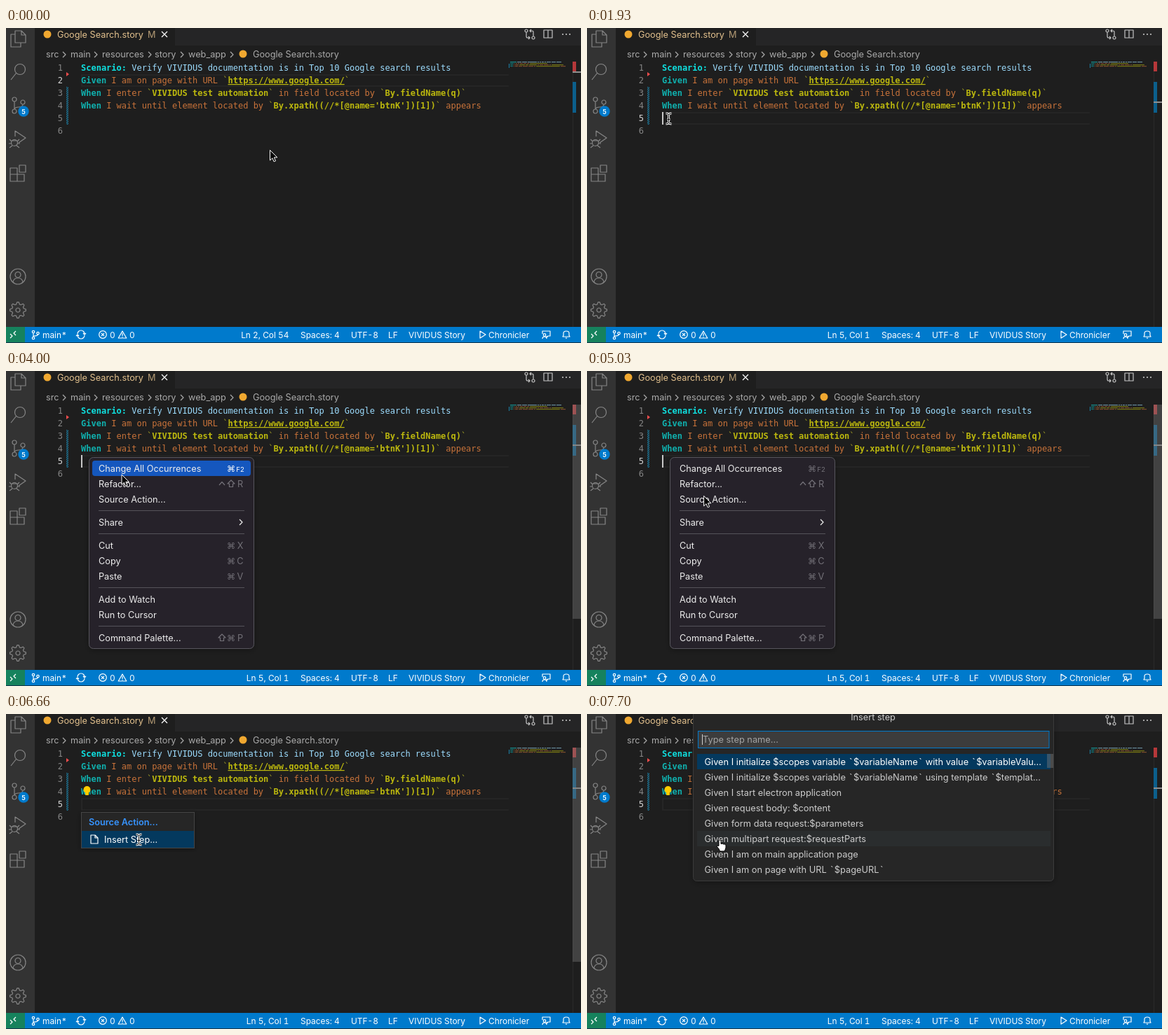
Recreate the animation shown at these times as an HTML page. Size 820x450 px, loop 7.99 s.

```html
<!DOCTYPE html>
<html lang="en">
<head>
<meta charset="utf-8">
<title>Story editor</title>
<style>
  html, body { margin: 0; width: 100%; height: 100%; overflow: hidden; background: #1e1e1e; }
  svg { display: block; }
  text { white-space: pre; font: 12.72px Inter, sans-serif; }
  .status { font-size: 11.9px; font-variant-numeric: tabular-nums; fill: #fff; }
  .code { font: 12px "DejaVu Sans Mono", monospace; }
  .step { font-size: 12.82px; }
  .tick { font-family: "Open Sans", sans-serif; }
  .bold { font-weight: 700; }
  .link { text-decoration: underline; text-underline-offset: 2.5px; }
  .key { font: 12px "DejaVu Sans", sans-serif; text-anchor: middle; }
  .icon { fill: none; stroke-linejoin: round; stroke-width: 1.2; }
</style>
</head>
<body>
<svg id="stage" width="820" height="450" viewBox="0 0 820 450"></svg>
<script>
const LOOP = 7990, FRAMES = 54;

const text = (x, y, s, fill, attrs = '') => `<text x="${x}" y="${y + 4.5}" fill="${fill}" ${attrs}>${s}</text>`;
const rect = (x, y, w, h, fill, attrs = '') =>
  `<rect x="${x}" y="${y}" width="${w}" height="${h}" fill="${fill}" ${attrs}/>`;
const icon = (x, y, d, color, attrs = '') =>
  `<path class="icon" transform="translate(${x} ${y})" d="${d}" stroke="${color}" ${attrs}/>`;
const dot = (x, y, r, fill, attrs = '') => `<circle cx="${x}" cy="${y}" r="${r}" fill="${fill}" ${attrs}/>`;
const group = (id, body) => `<g id="${id}">${body}</g>`;
const ring = (r, x = 0, y = 0) => `M${x - r} ${y}a${r} ${r} 0 1 0 ${2 * r} 0a${r} ${r} 0 1 0 ${-2 * r} 0`;

// Outline of a cogwheel with eight teeth
const cog = (outer, inner) => 'M' + Array.from({ length: 32 }, (_, i) => {
  const r = i % 4 < 2 ? outer : inner, a = (i - .5) * Math.PI / 16;
  return `${(r * Math.cos(a)).toFixed(1)} ${(r * Math.sin(a)).toFixed(1)}`;
}).join('L') + 'Z';

// Story text; parameters stand between backticks
const story = [
  'Scenario: Verify VIVIDUS documentation is in Top 10 Google search results',
  'Given I am on page with URL `https://www.google.com/`',
  'When I enter `VIVIDUS test automation` in field located by `By.fieldName(q)`',
  "When I wait until element located by `By.xpath((//*[@name='btnK'])[1])` appears"
];

function tokens(line) {
  const [, keyword, rest] = line.match(/^(\S+)(.*)$/);
  const scenario = keyword === 'Scenario:';
  const list = [[keyword, scenario ? '#0fe0e0' : '#10b0ae', 'bold']];
  rest.split('`').forEach((part, i) => {
    if (i) list.push(['`', '#a5a226', '']);
    const link = part.startsWith('http') ? ' link' : '';
    list.push(i % 2 ? [part, '#bcb80e', 'bold' + link] : [part, scenario ? '#9cdcfe' : '#c9733a', '']);
  });
  return list;
}

function code() {
  return story.map((line, i) => {
    const spans = tokens(line).map(([s, fill, style]) => `<tspan fill="${fill}" class="${style}">${s}</tspan>`);
    return text(107, 56.5 + 18 * i, spans.join(''), '#ccc', 'class="code"');
  }).join('');
}

function minimap() {
  let out = rect(717, 51, 1, 6, '#1b81a8');
  story.forEach((line, row) => {
    let col = 0;
    for (const [s, fill] of tokens(line)) {
      for (const word of s.matchAll(/\S+/g))
        out += rect(719 + col + word.index, 48 + row * 2, word[0].length, 1.2, fill, 'opacity=".55"');
      col += s.length;
    }
  });
  return out;
}

function activityBar() {
  const g = '#868686', wide = 'stroke-width="1.5"';
  return rect(0, 0, 41, 427, '#333333') +
    icon(17, 14, 'M-4-10H5L11-4V7H-4ZM5-10V-4H11M-4-5H-10V13H4V7', g, wide) +
    icon(17, 63, ring(7.5, 3, -4) + 'M-2.5 1.5L-10 11', g, wide) +
    icon(17, 110, ring(3, -5, -8) + ring(3, -5, 9) + ring(3, 7, -4) + 'M-5-5V6M7-1Q7 3 1 3Q-4 3-5 6', g, wide) +
    dot(25, 119, 7.7, '#007acc') + text(25, 118.5, '5', '#fff', 'text-anchor="middle" style="font-size:9px;font-weight:600"') +
    icon(17, 158, 'M-4-3V-11L11-1L1 6' + ring(4.5, -5, 6) + 'M-9 3H-1M-12 1L-9 4M2 1L-1 4M-13 7H-9M-1 7H3M-12 13L-8 10M2 13L-2 10', g, wide) +
    icon(17, 207, 'M-11-7H-1V12H-11ZM-11 2H9V12H-1M2-11H11V-1H2Z', g, wide) +
    icon(17, 355, ring(11) + ring(4, 0, -2.5) + 'M-7 8Q-6 2 0 2T7 8', g, wide) +
    icon(17, 403, cog(11.5, 8.5) + ring(3), g, wide);
}

function header() {
  const crumbs = [[57, 'src'], [92, 'main'], [137, 'resources'], [212, 'story'], [260, 'web_app'], [352, 'Google Search.story']];
  const c = '#c5c5c5';
  return rect(41, 0, 779, 25, '#252526') + rect(41, 0, 200, 25, '#1e1e1e') +
    dot(59, 9, 5.5, '#f0a830') + text(73, 9, 'Google Search.story', '#e2c08d') + text(202, 9, 'M', '#b59c75') +
    icon(226, 9, 'M-4-4L4 4M4-4L-4 4', '#fff', 'stroke-width="1.4"') +
    icon(747, 9, ring(2, -5, -5) + ring(2, 5, 5) + 'M-5-3V3Q-5 5-3 5H0M-2 3L0 5L-2 7M5 3V-3Q5-5 3-5H0M2-7L0-5L2-3', c) +
    icon(773, 9, 'M-6-6H6V5H-6ZM0-6V5', c) + [794, 799, 804].map(x => dot(x, 9, 1.1, c)).join('') +
    crumbs.map(([x, s]) => text(x, 37.5, s, '#a9a9a9')).join('') +
    [83, 128, 205, 251, 322].map(x => icon(x, 38, 'M-2-4L2 0L-2 4', '#a9a9a9')).join('') +
    dot(338, 37, 5.5, '#f0a830');
}

function editor() {
  const numbers = [1, 2, 3, 4, 5, 6].map(n =>
    text(81, 38.5 + 18 * n, n, '#858585', `id="num${n}" class="code" text-anchor="end"`)).join('');
  return '<path id="line" d="M717 67H108V83H717" fill="none" stroke="#292929" stroke-width="1.6"/>' + numbers +
    '<path d="M86 63L90 66L86 69Z" fill="#f14c4c"/>' + rect(86, 84, 3, 54, 'url(#hatch)') +
    code() + minimap() +
    rect(808, 48, 1, 379, '#2b2b2b') + rect(808, 48, 5, 14, '#b5383a') + rect(808, 77, 5, 44, '#0c5f8c') +
    rect(808, 62, 12, 2, '#8f8f8f', 'id="mark"') +
    rect(808, 48, 12, 306, '#797979', 'id="slider"') +
    rect(107, 120, 2, 18, '#c8c8c8', 'id="caret"');
}

function statusBar() {
  const y = 438, w = '#fff';
  const items = [[52, 'main*'], [148, '0'], [176, '0'], [420, 'Spaces: 4'], [492, 'UTF-8'], [545, 'LF'],
                 [574, 'VIVIDUS Story'], [688, 'Chronicler']];
  return rect(0, 427, 820, 22, '#007acc') + rect(0, 427, 27, 22, '#16825d') + rect(0, 449, 820, 1, '#15354c') +
    icon(10, y, 'M-4-1L-1 2L-4 5M4-5L1-2L4 1', w) +
    icon(42, y, ring(1.7, -3, -4) + ring(1.7, -3, 5) + ring(1.7, 3.5, -2) + 'M-3-2V3M3.5 0Q3 2-3 2', w) +
    icon(107, y, 'M-5-1A5 5 0 0 1 5-1M3-2L5 0L7-2M5 1A5 5 0 0 1-5 1M-7 2L-5 0L-3 2', w) +
    icon(138, y, ring(5.3) + 'M-2-2L2 2M2-2L-2 2', w) +
    icon(166, y, 'M0-5L5.8 5H-5.8ZM0-2V2M0 3V4', w) +
    icon(679, y, 'M-3-5L5 0L-3 5Z', w) +
    icon(770, y, 'M-5-1V-5H6V2H3L1 4V2M-5 6Q-5 3-2 3T1 6' + ring(1.8, -2, .5), w) +
    icon(799, y, 'M-5 3H5L4 1V-2Q4-5 0-5T-4-2V1ZM-1 4.5Q0 6 1 4.5', w) +
    items.map(([x, s]) => text(x, y, s, w, 'class="status"')).join('') +
    text(403.5, y, '', w, 'id="position" class="status" text-anchor="end"');
}

const keyShapes = { '⌃': 'M-4 2L0-2.5L4 2', '⇧': 'M0-5L5 0H2.5V4.5H-2.5V0H-5Z' };

function shortcut(y, keys) {
  return keys.map((s, i) => {
    const x = 334 - 13 * (keys.length - 1 - i);
    if (keyShapes[s]) return icon(x, y, keyShapes[s], 'currentColor', 'stroke-width="1"');
    const style = s === '⌘' ? 'class="key"' : `text-anchor="middle" ${s.length > 1 ? 'style="font-size:9.5px"' : ''}`;
    return text(x, y, s, 'currentColor', style);
  }).join('');
}

function contextMenu() {
  const items = [[139, 'Change All Occurrences', ['⌘', 'F2']], [161, 'Refactor...', ['⌃', '⇧', 'R']], [183, 'Source Action...'],
    [216, 'Share'], [249, 'Cut', ['⌘', 'X']], [271, 'Copy', ['⌘', 'C']], [293, 'Paste', ['⌘', 'V']],
    [326, 'Add to Watch'], [348, 'Run to Cursor'], [381, 'Command Palette...', ['⇧', '⌘', 'P']]];
  return rect(118.5, 123.5, 235, 273, '#26242b', 'rx="6" stroke="#58565d" filter="url(#shadow)"') +
    rect(123, 128, 226, 22, '#1557be', 'id="highlight" rx="4"') +
    [199, 232, 309, 364].map(y => rect(132, y, 208, 1, '#55535a')).join('') +
    items.map(([y, s, keys = []], i) => text(132, y, s, '#ececec') + group('keys' + i, shortcut(y, keys))).join('') +
    icon(335, 216, 'M-2-4L2 0L-2 4', '#ececec', 'stroke-width="1.7"');
}

function actionPopup() {
  return rect(107.5, 140.5, 161, 51, '#252526', 'stroke="#454545" filter="url(#shadow)"') + rect(108, 167, 160, 24, '#04395e') +
    text(118, 154, 'Source Action...', '#3794ff', 'style="font-weight:600"') +
    icon(126, 179, 'M-5-6H1L5-2V6H-5ZM1-6V-2H5', '#fff') + text(140, 179, 'Insert Step...', '#fff');
}

function stepPicker() {
  const steps = ['Given I initialize $scopes variable `$variableName` with value `$variableValu...',
    'Given I initialize $scopes variable `$variableName` using template `$templat...',
    'Given I start electron application', 'Given request body: $content', 'Given form data request:$parameters',
    'Given multipart request:$requestParts', 'Given I am on main application page', 'Given I am on page with URL `$pageURL`'];
  const wideTicks = s => s.replace(/`/g, '<tspan class="tick">`</tspan>');
  return rect(151.5, -10, 514, 248.5, '#252526', 'rx="5" stroke="#3a3a3a" filter="url(#shadow)"') +
    text(408, 4.5, 'Insert step', '#ccc', 'text-anchor="middle"') +
    rect(158.5, 24.5, 500.5, 24, '#3c3c3c', 'stroke="#007acc"') + text(165, 36.5, 'Type step name...', '#a3a3a3', 'class="step"') +
    rect(164, 29, 1, 15, '#d0d0d0', 'id="inputCaret"') +
    rect(157, 57, 504, 22, '#04395e') + rect(157, 167, 504, 22, '#2a2d2e') +
    rect(656, 57, 9, 20, '#797979', 'opacity=".45"') +
    steps.map((s, i) => text(167.5, 68 + 22 * i, wideTicks(s), i ? '#ccc' : '#fff', 'class="step"')).join('');
}

const beam = 'M-4-7.5Q0-7.5 0-5Q0-7.5 4-7.5M0-5V5M-4 7.5Q0 7.5 0 5Q0 7.5 4 7.5M-2 1H2';
const pointers =
  '<path id="arrow" d="M0 0V14.5L3.4 11.3L5.6 16.4L8 15.4L5.8 10.4H10.3Z" fill="#000" stroke="#fff"/>' +
  `<g id="beam" fill="none"><path d="${beam}" stroke="#fff" stroke-width="3"/><path d="${beam}" stroke="#000"/></g>` +
  '<path id="hand" d="M-1.5 8V2Q-1.5.5 0 .5T1.5 2V6Q4 5 5 6.5Q7 6 8.5 7.5V11Q8.5 13 6.5 16.5H0Q-1 13-4 10Q-4.5 7.5-1.5 9Z" fill="#fff" stroke="#000"/>';

const stage = document.getElementById('stage');
stage.innerHTML = `<defs>
  <pattern id="hatch" width="3" height="3" patternUnits="userSpaceOnUse"><path d="M-1 4L4-1M-1 1L1-1M2 4L4 2" stroke="#1b81a8" stroke-width="1.1"/></pattern>
  <filter id="shadow"><feDropShadow dx="0" dy="2" stdDeviation="4" flood-opacity=".3"/></filter></defs>` +
  rect(0, 0, 820, 450, '#1e1e1e') + header() + editor() + activityBar() + statusBar() +
  group('menu', contextMenu()) +
  group('bulb', dot(115.5, 108, 5, '#ffcc00') + rect(113, 111, 5, 5, '#ffcc00', 'rx="1"')) +
  group('popup', actionPopup()) + group('picker', stepPicker()) + group('pointer', pointers);

const el = id => document.getElementById(id);
const show = (id, on) => el(id).setAttribute('visibility', on ? 'inherit' : 'hidden');

// Pointer stops: step, x, y
const stops = [[3, 376.5, 174.5], [11, 123, 137], [12, 116.5, 129.5], [22, 116.5, 129.5], [27, 165, 148],
               [32, 166.5, 178], [38, 167, 179.5], [41, 189.5, 179.5]];

function pointerAt(k) {
  if (k <= stops[0][0]) return stops[0].slice(1);
  const i = stops.findIndex(s => s[0] >= k);
  if (i < 0) return stops.at(-1).slice(1);
  const [a, b] = [stops[i - 1], stops[i]];
  const p = (k - a[0]) / (b[0] - a[0]), e = p * p * (3 - 2 * p);
  return [1, 2].map(n => a[n] + (b[n] - a[n]) * e);
}

function render(t) {
  const k = Math.floor((t + 5) * FRAMES / LOOP);
  const between = (a, b) => k >= a && k < b;
  const [x, y] = pointerAt(k);

  const row = k < 12 ? 2 : 5;
  el('line').setAttribute('transform', `translate(0 ${(row - 2) * 18})`);
  for (const n of [2, 5]) el('num' + n).setAttribute('fill', n === row ? '#d6d6d6' : '#858585');
  el('position').textContent = row === 2 ? 'Ln 2, Col 54' : 'Ln 5, Col 1';
  el('mark').setAttribute('y', row === 2 ? 62 : 105);
  el('slider').setAttribute('opacity', k < 14 || k >= 52 ? 0 : k < 49 ? .4 : k < 51 ? .3 : .12);
  show('caret', between(12, 17) || between(20, 23) || between(26, 29) || between(32, 35));

  show('menu', between(20, 36));
  const item = y < 150 ? 0 : y < 172 ? 1 : 2;
  const lit = between(20, 36) && x > 123 && k !== 34;
  show('highlight', lit);
  el('highlight').setAttribute('y', 128 + 22 * item);
  for (let i = 0; i < 10; i++) el('keys' + i).setAttribute('color', lit && i === item ? '#fff' : '#737178');

  show('bulb', k >= 37);
  show('popup', between(37, 46));
  show('picker', k >= 46);
  show('inputCaret', !between(49, 52));

  const shape = k < 4 || between(20, 36) ? 'arrow' : between(37, 45) || k >= 46 ? 'hand' : 'beam';
  for (const id of ['arrow', 'beam', 'hand']) show(id, id === shape);
  el('pointer').setAttribute('transform', `translate(${x} ${y})`);
}

const start = performance.now();
function tick() {
  render((performance.now() - start) % LOOP);
  requestAnimationFrame(tick);
}
tick();
</script>
</body>
</html>
```
